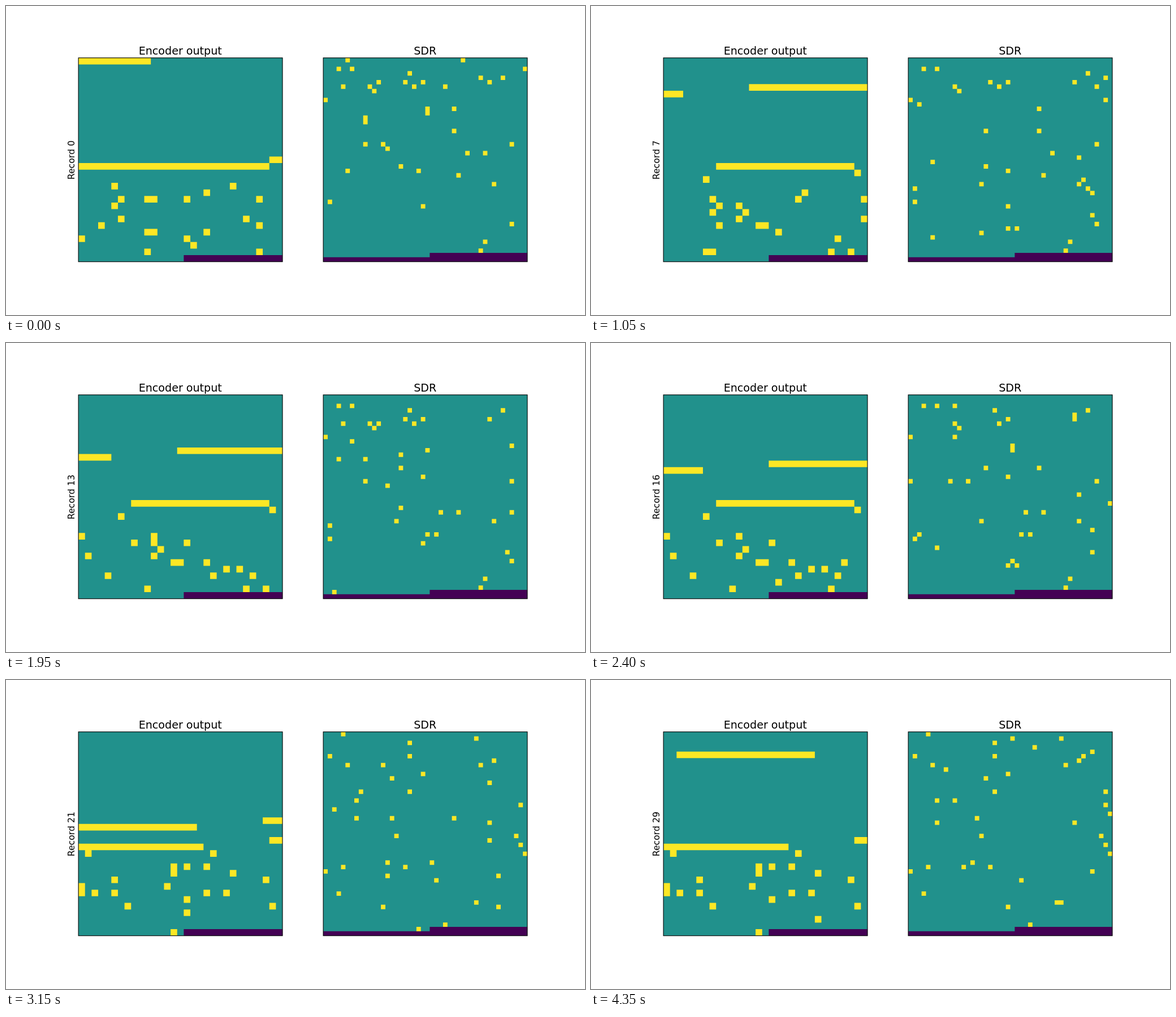
An HTML page with a canvas that plays this animation: 1024x547 px, repeating every 4500 ms.

```html
<!DOCTYPE html>
<html>
<head>
<meta charset="utf-8">
<title>Encoder output and SDR</title>
<style>
html, body { margin: 0; width: 100%; height: 100%; overflow: hidden; background: #fff; }
canvas { display: block; }
</style>
</head>
<body>
<canvas id="stage" width="1024" height="547"></canvas>
<script>
const ctx = document.getElementById('stage').getContext('2d');
const STEP = 150, RECORDS = 30;
const TEAL = '#21918c', YELLOW = '#fde725', PURPLE = '#440154';
const TOP = 91.8, SIZE = 360.9;

const WIDTH = 21;               // active bits per encoded field
const DAY = 24 * WIDTH, WEEKEND = 2 * WIDTH, VALUES = 400;
const COLUMNS = 2048, WINNERS = 40, WEEKEND_WEIGHT = 3;

const encoder = { title: 'Encoder output', x: 128.1, n: 31, used: DAY + WEEKEND + VALUES };
const sdr = { title: 'SDR', x: 561.1, n: 46, used: COLUMNS };

// Load over the hours as [hour, bucket]: quiet nights, busy days.
const load = [[0, 0], [2, -19], [4, -19], [6, 30], [11, 26], [14, 16], [19, 19],
  [21, -18], [23, -18], [24, 0], [25, 1], [27, -19], [29, -19]];

function bucketAt(hour) {
  const next = Math.max(1, load.findIndex(([h]) => h >= hour));
  const [h0, b0] = load[next - 1], [h1, b1] = load[next];
  return Math.round(b0 + (b1 - b0) * (hour - h0) / (h1 - h0));
}

// Repeatable random number in [0, 1) for a pair of integers.
function noise(a, b) {
  let h = Math.imul(a + 1, 374761393) ^ Math.imul(b + 1, 668265263);
  h = Math.imul(h ^ h >>> 13, 1274126177);
  h = Math.imul(h ^ h >>> 15, 2246822519);
  return ((h ^ h >>> 16) >>> 0) / 2 ** 32;
}

const range = (length, f) => Array.from({ length }, (_, i) => f(i));

// Neighbouring buckets share all but one bit of this shuffled chain.
const chain = range(VALUES, i => i).sort((a, b) => noise(a, 7) - noise(b, 7));

function encode(record) {
  const start = record * WIDTH - 10 + DAY;
  const weekend = record >= 18 ? WIDTH : 0;
  const first = 20 + bucketAt(record);
  return {
    time: range(WIDTH, i => (start + i) % DAY),
    weekend: range(WIDTH, i => DAY + weekend + i),
    value: range(WIDTH, i => DAY + WEEKEND + chain[first + i])
  };
}

// Columns are randomly wired to the input; the best matches win.
function pool({ time, weekend, value }) {
  const match = (bits, column) => bits.reduce((sum, bit) => sum + noise(column, bit), 0);
  const scores = range(COLUMNS, c =>
    match(time, c) + match(value, c) + WEEKEND_WEIGHT * match(weekend, c));
  return range(COLUMNS, c => c).sort((a, b) => scores[b] - scores[a]).slice(0, WINNERS);
}

const records = range(RECORDS, record => {
  const input = encode(record);
  return { bits: Object.values(input).flat(), winners: pool(input) };
});

function fillCells({ x, n }, cells, color) {
  const size = SIZE / n;
  ctx.beginPath();
  for (const cell of cells) {
    ctx.rect(x + cell % n * size, TOP + Math.floor(cell / n) * size, size, size);
  }
  ctx.fillStyle = color;
  ctx.fill();
}

function drawPanel(panel, cells) {
  const { title, x, n, used } = panel;
  ctx.fillStyle = TEAL;
  ctx.fillRect(x, TOP, SIZE, SIZE);
  fillCells(panel, range(n * n - used, i => used + i), PURPLE);
  fillCells(panel, cells, YELLOW);
  ctx.strokeStyle = '#000';
  ctx.lineWidth = 1.1;
  ctx.strokeRect(x, TOP, SIZE, SIZE);
  ctx.fillStyle = '#000';
  ctx.font = '19.1px "DejaVu Sans", sans-serif';
  ctx.fillText(title, x + SIZE / 2 - 0.3, 86);
}

function draw(record) {
  ctx.fillStyle = '#fff';
  ctx.fillRect(0, 0, 1024, 547);
  ctx.textAlign = 'center';
  drawPanel(encoder, records[record].bits);
  drawPanel(sdr, records[record].winners);
  ctx.save();
  ctx.translate(121, TOP + SIZE / 2 + 0.4);
  ctx.rotate(-Math.PI / 2);
  ctx.font = '15.7px "DejaVu Sans", sans-serif';
  ctx.fillText('Record ' + record, 0, 0);
  ctx.restore();
}

function tick() {
  draw(Math.floor(performance.now() / STEP) % RECORDS);
  requestAnimationFrame(tick);
}
tick();
</script>
</body>
</html>
```
